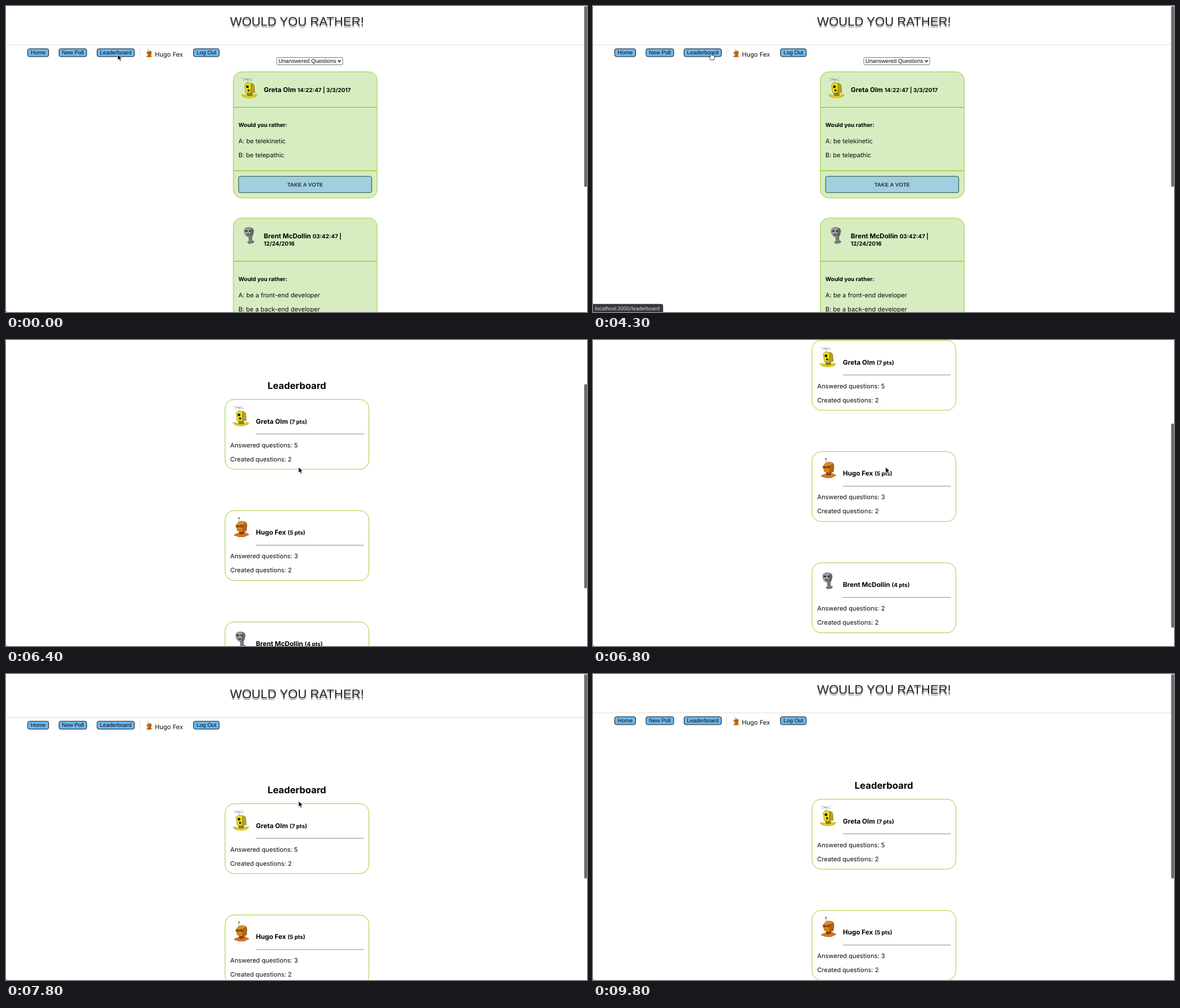
An HTML page that plays this animation: 1030 px wide and 544 px high, repeating every 9900 ms.

```html
<!DOCTYPE html>
<html lang="en">
<head>
<meta charset="utf-8">
<title>Would you rather</title>
<style>
  html, body { margin: 0; width: 100%; height: 100%; overflow: hidden; background: #fff; }
  svg { display: block; width: 1030px; height: 544px; }
  text { font: 11.1px Inter, sans-serif; fill: #0b0b0b; white-space: pre; text-rendering: geometricPrecision; }
  .bold { font-size: 11.7px; font-weight: 700; fill: #000; }
  .small { font-size: 9.95px; font-weight: 700; fill: #000; }
  .heading { font-size: 16.6px; font-weight: 700; fill: #000; }
  .title { font: 22.1px "Liberation Sans", Arial, sans-serif; }
  .control { font: 9.85px "Liberation Sans", Arial, sans-serif; }
  .vote { font: bold 9.65px "Liberation Sans", Arial, sans-serif; fill: #24393f; }
  .status { font: 9.3px Roboto, sans-serif; fill: #d5d6d8; }
</style>
</head>
<body>
<svg viewBox="0 0 1030 544">
  <defs>
    <g id="yellow" stroke="#4b4710" stroke-width=".5">
      <path d="M4 2L23 6M6 6L22 2M10 1L17 7M14 4V11" stroke="#777" fill="none"/>
      <path d="M3 31Q8 30 12 32H22Q27 29 32 31Q29 37 17 37Q6 37 3 31Z" fill="#e0cf1c" stroke="#b5a81e"/>
      <path d="M6 32L10 35M25 35L30 32" stroke="#8a8a2a"/>
      <path d="M13 29H23L22 33H14Z" fill="#8f850e"/>
      <path d="M9 14Q11 10 15 10L21 11L20 28L11 28Z" fill="#efdd16"/>
      <path d="M21 11Q26 12 26 16L27 27L20 28Z" fill="#b5a519"/>
      <path d="M12 15H16V19H12Z" fill="#151508"/>
      <circle cx="16" cy="23.5" r="1.8" fill="#151508"/>
    </g>
    <g id="orange" stroke="#6b3b0c" stroke-width=".5">
      <path d="M14 2V10M12 4H16" stroke="#555"/>
      <circle cx="14" cy="2" r=".9" fill="#555"/>
      <path d="M5 33Q10 29 16 29L25 28L32 32L23 36H14Z" fill="#df7617"/>
      <path d="M15 25H23V30L18 32L14 30Z" fill="#854410"/>
      <path d="M9 16Q11 10 18 8L25 9Q28 11 28 16L27 25L20 28L11 25Z" fill="#e58a20"/>
      <path d="M21 14L27 11Q28 13 28 16L27 25L20 28Z" fill="#b86313"/>
      <path d="M8 16L21 15V19L9 19Z" fill="#a75d19"/>
      <path d="M11 17H13M17 17H19" stroke="#221408" stroke-width="1.3"/>
      <path d="M12 23H19" stroke="#70390b"/>
    </g>
    <g id="gray" stroke="#3b3b40" stroke-width=".5">
      <path d="M16 22H22L22 30L26 32L24 35L16 36L14 33L17 31Z" fill="#85858a"/>
      <path d="M17 26H22M17 29H22M16 33H24" fill="none"/>
      <path d="M8 13Q9 7 16 7Q25 7 25 14L23 22L15 24Q9 22 8 13Z" fill="#98989d"/>
      <path d="M21 8Q25 10 25 14L23 22L19 23Z" fill="#68686d"/>
      <path d="M10 13.5H14M17 13.5H20" stroke="#211c27" stroke-width="2.2"/>
      <path d="M13 20H18" stroke="#29292d" stroke-width="1.8"/>
    </g>
  </defs>
  <g id="page">
    <g id="header"></g>
    <g id="home"></g>
    <g id="leaderboard"></g>
  </g>
  <rect id="thumb" x="1025" width="5" rx="2" fill="#6d6d6d"/>
  <path d="M0 541.5Q.5 543.5 2 544H0Z" fill="#333"/>
  <g id="status">
    <path d="M0 530H121Q124 530 124 533V544H0Z" fill="#38393c" stroke="#222" stroke-width=".5"/>
    <text class="status" x="3.5" y="541">localhost:3000/leaderboard</text>
  </g>
  <g id="cursor" stroke="#fff" stroke-width=".8" stroke-linejoin="round">
    <path id="arrow" d="M0 0V10.3L2.4 8.1L4.1 12L6 11.2L4.3 7.4H7.5Z" fill="#000"/>
    <path id="hand" d="M-1 1Q0-.8 1.2 1V4.6Q2.3 3.8 3 5Q4.2 4.3 4.8 5.5Q6.2 5 6.3 6.8V9Q5.5 11 5.2 13H-.7Q-1.2 11-3.2 8.7Q-4 6.6-2.4 6.8L-1 8Z" fill="#fff" stroke="#111"/>
  </g>
</svg>
<script>
const LOOP = 9900, STEP = 100, VIEW = 544;
const el = id => document.getElementById(id);

const text = (x, y, content, style = "", extra = "") =>
  `<text x="${x}" y="${y}" class="${style}" ${extra}>${content}</text>`;
const box = (x, y, w, h, r, fill, stroke) =>
  `<rect x="${x}" y="${y}" width="${w}" height="${h}" rx="${r}" fill="${fill}" stroke="${stroke}"/>`;
const line = (x1, x2, y, color, width = 1) =>
  `<path d="M${x1} ${y}H${x2}" stroke="${color}" stroke-width="${width}"/>`;
const robot = (kind, x, y, scale = 1) =>
  `<use href="#${kind}" transform="translate(${x} ${y}) scale(${scale})"/>`;
const nameLine = (x, y, name, detail) =>
  text(x, y, `${name} <tspan class="small">${detail}</tspan>`, "bold");

const GREEN = "#9acd32";
const users = [
  { name: "Greta Olm", robot: "yellow", answered: 5, created: 2 },
  { name: "Hugo Fex", robot: "orange", answered: 3, created: 2 },
  { name: "Brent McDollin", robot: "gray", answered: 2, created: 2 },
];

function header() {
  const buttons = [["Home", 38.5, 37], ["New Poll", 94, 49], ["Leaderboard", 161.5, 66], ["Log Out", 332.5, 45.5]];
  const title = (y, color) => text(516, y, "WOULD YOU RATHER!", "title", `text-anchor="middle" style="fill:${color}"`);
  return title(37.5, "#999") + title(36, "#fff") + title(34.5, "#222")
    + line(0, 1025, 69, "#ddd")
    + buttons.map(([label, x, w]) => box(x, 76, w, 14, 3, "#6bb9f0", "#111")
      + text(x + w / 2, 86.4, label, "control", 'text-anchor="middle"')).join("")
    + '<path d="M237 75V91" stroke="#ddd"/>'
    + robot("orange", 246, 76, 0.42) + text(264, 90, users[1].name);
}

function pollCard(user, y, split, time, date, options) {
  const bodyTop = y + split;
  return box(403, y, 255, split + 161, 15, "#d7edc1", GREEN)
    + robot(user.robot, 414, y + 9.5)
    + nameLine(457, y + (date ? 35.5 : 36), user.name, time)
    + (date ? text(457, y + 48.5, date, "small") : "")
    + line(403, 658, bodyTop, GREEN, 1.6)
    + text(412, bodyTop + 35, "Would you rather:", "small")
    + text(412, bodyTop + 64, "A: " + options[0])
    + text(412, bodyTop + 89, "B: " + options[1])
    + line(403, 658, bodyTop + 112.5, GREEN, 1.6)
    + box(412.3, bodyTop + 122.5, 236, 29, 3, "#a1cfe0", "#26483d")
    + text(530.3, bodyTop + 140.5, "TAKE A VOTE", "vote", 'text-anchor="middle"');
}

function home() {
  return box(480, 91.5, 117, 13, 2, "#fff", "#777")
    + text(483, 101.3, "Unanswered Questions", "control")
    + '<path d="M588.5 96.5L591 99.5L593.5 96.5" fill="none" stroke="#111" stroke-width="1.4"/>'
    + pollCard(users[0], 117, 63.3, "14:22:47 | 3/3/2017", "", ["be telekinetic", "be telepathic"])
    + pollCard(users[2], 377, 76.7, "03:42:47 |", "12/24/2016", ["be a front-end developer", "be a back-end developer"]);
}

function scoreCard(user, i) {
  const y = 222.6 + i * 197.8;
  return box(388.3, y, 255, 124.3, 16, "#fff", GREEN)
    + robot(user.robot, 399, y + 10.5)
    + nameLine(443, y + 43, user.name, `(${user.answered + user.created} pts)`)
    + line(443, 634, y + 61.5, "#888")
    + text(397.5, y + 85, "Answered questions: " + user.answered)
    + text(397.5, y + 110, "Created questions: " + user.created);
}

el("header").innerHTML = header();
el("home").innerHTML = home();
el("leaderboard").innerHTML =
  text(515.7, 204, "Leaderboard", "heading", 'text-anchor="middle"') + users.map(scoreCard).join("");

// Rows: time, then the values reached at that time.
const cursorPath = [
  [0, 198, 86], [900, 48, 82], [1400, 55, 75], [1800, 57.5, 83], [2500, 57.5, 83],
  [3500, 205, 84], [4300, 209, 83], [5400, 209, 83], [5900, 518.7, 226],
  [8500, 518.7, 226], [9300, 644, 548], [LOOP, 644, 548],
];
const scrollPath = [
  [0, 0], [5900, 0], [6100, 22], [6400, 117], [6700, 205], [7000, 256], [7300, 271.5],
  [7450, 271.5], [7700, 0], [7800, -8], [8000, -3], [8200, 0], [LOOP, 0],
];
const linear = p => p;
const smooth = p => p * p * (3 - 2 * p);

function along(path, t, ease) {
  const i = path.findIndex(row => row[0] > t);
  const [from, to] = [path[i - 1], path[i]];
  const p = ease((t - from[0]) / (to[0] - from[0]));
  return from.slice(1).map((v, k) => v + (to[k + 1] - v) * p);
}
const show = (id, on) => el(id).setAttribute("visibility", on ? "visible" : "hidden");

function draw(now) {
  const t = Math.floor(now % LOOP / STEP) * STEP;
  const onBoard = t >= 4700;
  const pointing = t >= 3600 && t <= 5400;
  const [scroll] = along(scrollPath, t, linear);
  const [x, y] = along(cursorPath, t, smooth);
  const pageHeight = onBoard ? 815.5 : 922;

  show("home", !onBoard);
  show("leaderboard", onBoard);
  el("page").setAttribute("transform", `translate(0 ${-scroll})`);
  el("thumb").setAttribute("y", Math.max(0, scroll) * VIEW / pageHeight + 0.5);
  el("thumb").setAttribute("height", VIEW * VIEW / pageHeight);
  show("status", t >= 3800 && t <= 5500);
  show("arrow", !pointing);
  show("hand", pointing);
  el("cursor").setAttribute("transform", `translate(${x} ${y})`);
  requestAnimationFrame(() => draw(performance.now()));
}
draw(performance.now());
</script>
</body>
</html>
```
